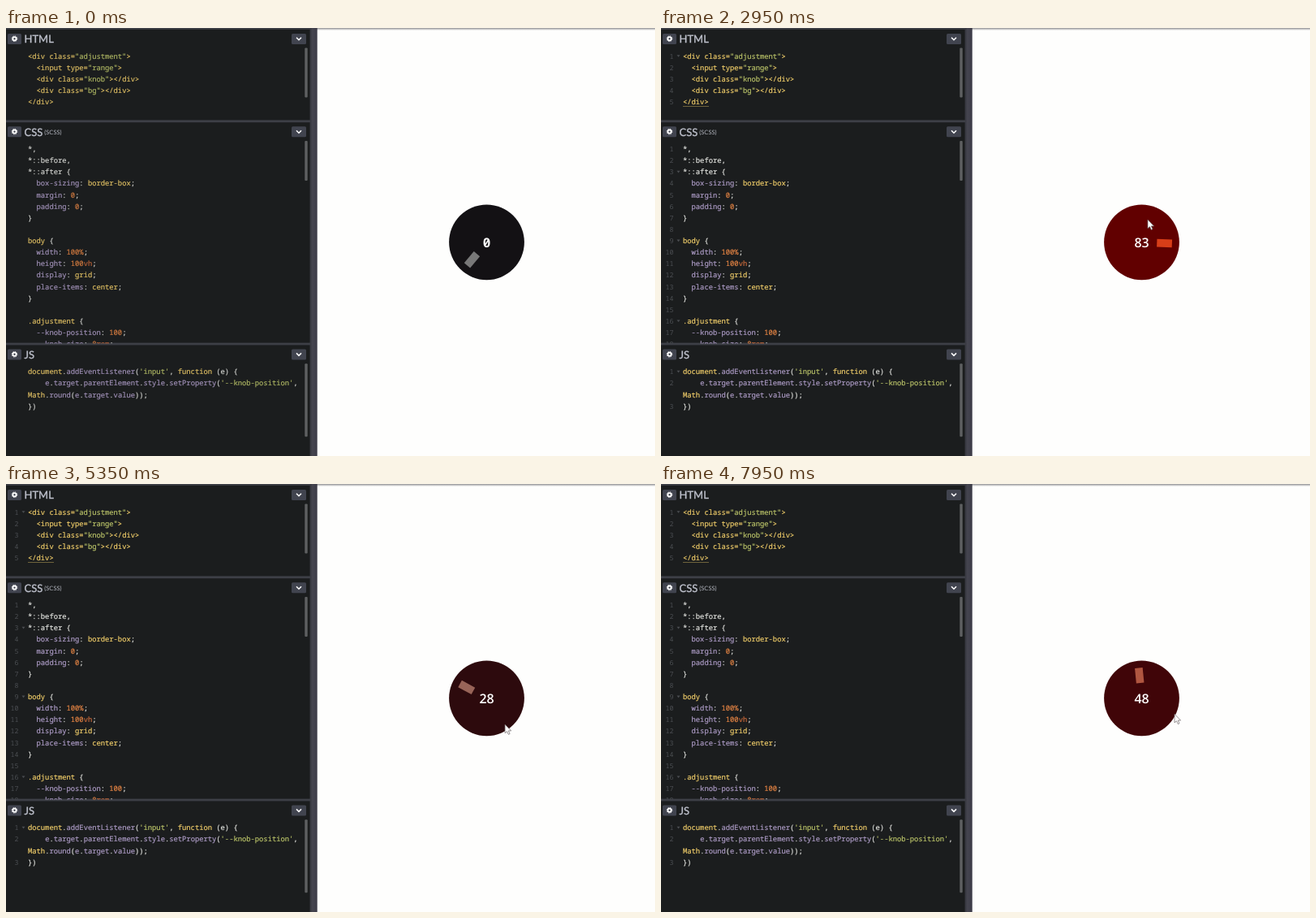
Write an HTML page that moves like this. It is 800 px wide and 527 px high and loops after 8000 ms.

```html
<!DOCTYPE html>
<html lang="en">
<head>
<meta charset="utf-8">
<title>Knob control</title>
<style>
  html, body { margin: 0; width: 100%; height: 100%; overflow: hidden; background: #fefefd; }
  svg { display: block; width: 100vw; height: 100vh; }
  text { white-space: pre; text-rendering: geometricPrecision; }
  .code { font: 8.81px "Noto Sans Mono", monospace; }
  .code tspan { fill: currentColor; stroke: currentColor; stroke-width: .2; }
  .num { font: 8.3px "Noto Sans Mono", monospace; text-anchor: end; }
  .gutter { fill: #4b4e52; opacity: var(--sharp); }
  .title { font: 13px Lato, sans-serif; fill: #bfc2cd; stroke: #bfc2cd; stroke-width: .35; }
  .note { font: 7.5px Lato, sans-serif; fill: #b4b7c0; }
  #value { font: 600 16px "Open Sans", sans-serif; fill: #fff; text-anchor: middle; }
  #value .zero { font-family: "Noto Sans Mono", monospace; }
</style>
</head>
<body>
<svg id="stage" viewBox="0 0 800 527" preserveAspectRatio="none">
  <defs>
    <linearGradient id="shade" x2="0" y2="1">
      <stop stop-color="#8f8f92"/><stop offset="1" stop-color="#fefefd"/>
    </linearGradient>
    <linearGradient id="split">
      <stop stop-color="#33343c"/><stop offset=".35" stop-color="#45454f"/><stop offset="1" stop-color="#3b3a47"/>
    </linearGradient>
    <clipPath id="pane"><rect width="375" height="388.5"/></clipPath>
  </defs>
  <rect width="800" height="527" fill="#fefefd"/>
  <rect x="383" width="417" height="3" fill="url(#shade)"/>
  <rect width="375" height="527" fill="#1b1d1e"/>
  <rect x="374.5" width="9.2" height="527" fill="url(#split)"/>
  <g id="chrome"></g>
  <g id="upper" clip-path="url(#pane)"></g>
  <g id="lower"></g>
  <g transform="translate(592.5 263.8)">
    <circle id="disc" r="46.4"/>
    <rect id="mark" x="-4.8" y="-37.4" width="9.6" height="18.6"/>
    <text id="value" y="6"></text>
  </g>
  <path id="cursor" d="M0 0V10.6L2.5 8.5L4.3 12.3L6 11.5L4.3 7.8H7.6Z" fill="#fff" stroke="#6d6668" stroke-width=".7"/>
</svg>
<script>
const $ = id => document.getElementById(id);
const LOOP = 8000, STEP = 50, LINE = 14.12;

const ink = { w: '#e2e3df', y: '#efcc69', g: '#b9c268', p: '#ab9ac4', o: '#e08243', r: '#c9693a' };

// "~x" switches the ink, a leading "+" marks a foldable line, "|" a wrapped one
const panels = [
  { title: 'HTML', note: '', y: 0, thumb: 61, into: 'upper', lines: [
    '+~y<div class=~g"adjustment"~y>',
    '  ~y<input type=~g"range"~y>',
    '  ~y<div class=~g"knob"~y></div>',
    '  ~y<div class=~g"bg"~y></div>',
    '~y</div>'] },
  { title: 'CSS', note: '(SCSS)', y: 114.4, thumb: 49, into: 'upper', lines: [
    '~w*,', '~w*::before,', '+~w*::after {',
    '  ~pbox-sizing~w: ~yborder-box~w;', '  ~pmargin~w: ~o0~w;', '  ~ppadding~w: ~o0~w;', '~w}', '',
    '+~ybody ~w{',
    '  ~pwidth~w: ~o100%~w;', '  ~pheight~w: ~o100~rvh~w;', '  ~pdisplay~w: ~ygrid~w;',
    '  ~pplace-items~w: ~ycenter~w;', '~w}', '',
    '+~y.adjustment ~w{',
    '  ~p--knob-position~w: ~o100~w;', '  ~p--knob-size~w: ~o8~rrem~w;'] },
  { title: 'JS', note: '', y: 388.6, thumb: 90, into: 'lower', lines: [
    "+~ydocument~w.~paddEventListener~w(~g'input'~w, ~yfunction ~w(e) {",
    "    ~pe~w.~ptarget~w.~pparentElement~w.~pstyle~w.~psetProperty~w(~g'--knob-position'~w,",
    '|~yMath~w.~pround~w(~pe~w.~ptarget~w.~pvalue~w));',
    '~w})'] }
];

const escape = s => s.replace(/&/g, '&amp;').replace(/</g, '&lt;');
const paint = line => line.split('~').map((part, i) =>
  i ? `<tspan style="color:${ink[part[0]]}">${escape(part.slice(1))}</tspan>` : part).join('');
const add = (id, markup) => $(id).insertAdjacentHTML('beforeend', markup);

for (const { title, note, y: top, thumb, into, lines } of panels) {
  const mid = top + 13.2;
  const button = (x, w) => `<rect x="${x}" y="${mid - 6.3}" width="${w}" height="13" rx="1.5" fill="#41444f"/>`;
  add('chrome', `
    <rect y="${top - 1}" width="375" height="2.8" fill="#3d3f46"/>
    ${button(2, 17)}${button(352, 18)}
    <g fill="none" stroke="#fff">
      <circle cx="10.5" cy="${mid}" r="2.1" stroke-width="1.8"/>
      <circle cx="10.5" cy="${mid}" r="3.3" stroke-dasharray="1.3 1.292"/>
      <path d="M358 ${mid - 1.4}l3 3l3 -3" stroke-width="1.5"/>
    </g>
    <text class="title" x="22.5" y="${mid + 5}">${title}</text>
    <text class="note" x="47.3" y="${mid + 3.2}">${note}</text>
    <rect x="368.3" y="${top + 24.6}" width="3.4" height="${thumb}" rx="1" fill="#5e6061"/>`);
  let number = 0;
  lines.forEach((line, i) => {
    const y = top + 37.7 + i * LINE;
    add(into, `<text class="code" x="27" y="${y}">${paint(line.replace(/^[+|]/, ''))}</text>`);
    if (line[0] !== '|') add(into, `<text class="gutter num" x="15.5" y="${y}">${++number}</text>`);
    if (line[0] === '+') add(into, `<path class="gutter" d="M19.5 ${y - 4.5}h4l-2 2.6z"/>`);
  });
}
add('upper', '<path class="gutter" d="M27 96.5h32" stroke="#857545" stroke-width=".8"/>');

// each drag: start, end, value reached
const drags = [[800, 1200, 17], [1350, 2230, 86], [2830, 3680, 21.4], [3690, 3960, 15], [4230, 4640, 80],
  [4640, 5340, 28], [5430, 5900, 70], [5930, 6660, 55], [6780, 7560, 49], [7680, 7950, 48]];

const clamp = v => Math.min(1, Math.max(0, v));
const ease = p => (1 - Math.cos(Math.PI * clamp(p))) / 2;
const knobAt = t => drags.reduce((v, [from, to, goal]) => v + (goal - v) * ease((t - from) / (to - from)), 0);
const rgb = (...c) => `rgb(${c.map(v => Math.max(0, Math.round(v)))})`;

function draw(t) {
  const exact = knobAt(t), v = Math.round(exact);
  const sharp = clamp((t - 500) / 250);
  const x = 600 + Math.min(33, Math.max(0, (t - 4430) * .0164));
  const y = 314 - exact * (t < 4100 ? .94 : .64);
  $('disc').setAttribute('fill', rgb(19 + .94 * v, 17 - .25 * v, 20 - .24 * v));
  $('mark').setAttribute('fill', rgb(120 + 1.16 * v, 120 - .7 * v, 120 - 1.16 * v));
  $('mark').setAttribute('transform', `rotate(${(v - 50) * 2.8})`);
  $('value').innerHTML = String(v).replace(/0/g, '<tspan class="zero">0</tspan>');
  $('cursor').setAttribute('transform', `translate(${x} ${y})`);
  $('cursor').style.opacity = t < 800 ? 0 : 1;
  $('stage').style.setProperty('--sharp', sharp);
  $('upper').style.opacity = $('lower').style.opacity = .9 + .1 * sharp;
}

const start = performance.now();
function tick() {
  const t = (performance.now() - start) % LOOP;
  draw(Math.floor(t / STEP) * STEP);
  requestAnimationFrame(tick);
}
tick();
</script>
</body>
</html>
```
